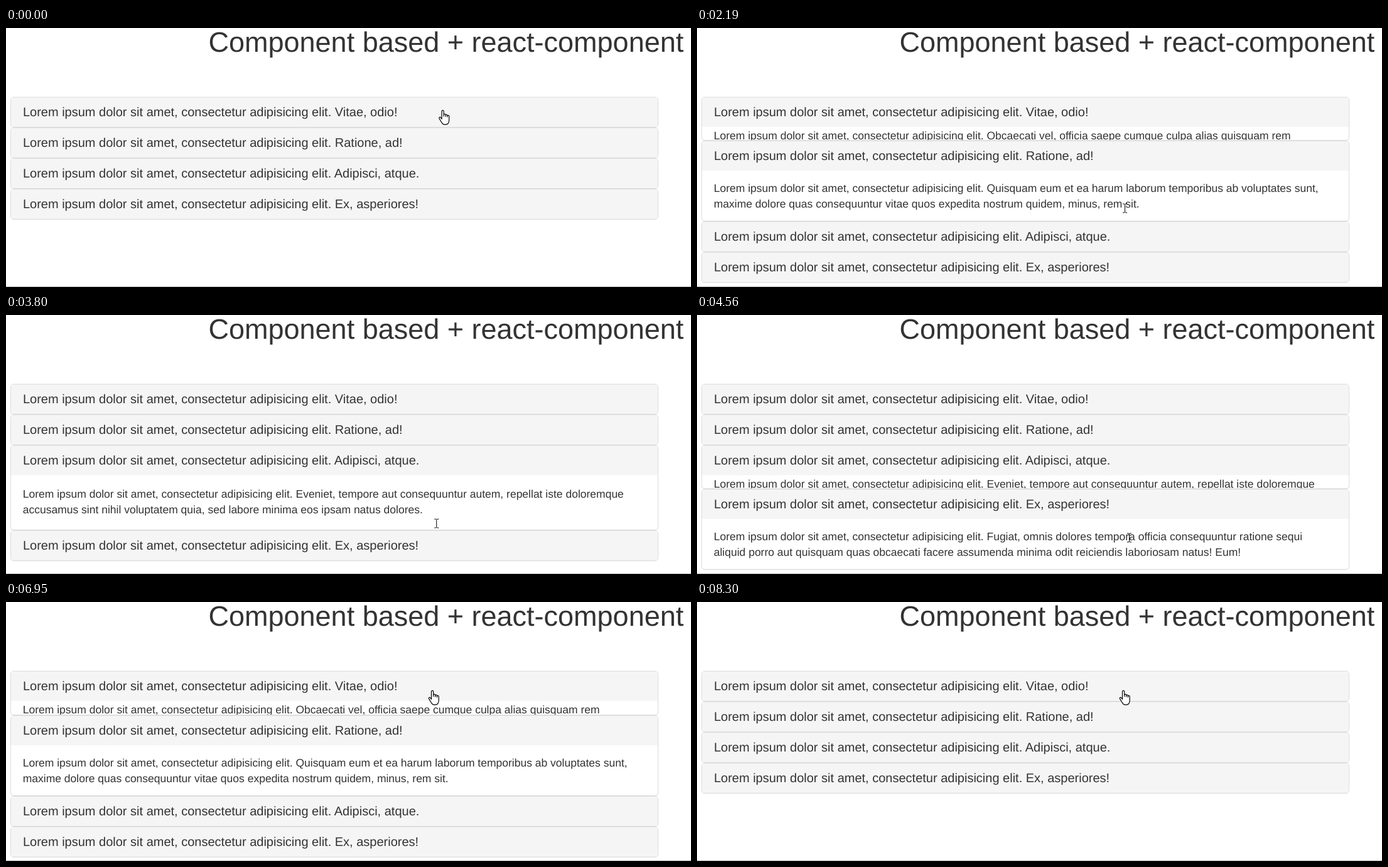
Write an HTML page that moves like this. It is 1091x414 px and loops after 8.69 s.

```html
<!DOCTYPE html>
<html lang="en">
<head>
<meta charset="utf-8">
<title>Accordion</title>
<style>
  html, body { margin: 0; width: 100%; height: 100%; overflow: hidden; background: #fff; }
  #stage { position: relative; width: 1091px; height: 414px; overflow: hidden; }
  svg { position: absolute; left: 0; top: 0; overflow: visible; }
  text { font-family: Arial, "Liberation Sans", sans-serif; fill: #333; text-rendering: geometricPrecision; }
  .panel {
    position: absolute; left: 7px; width: 1030px; overflow: hidden; background: #fff;
    border: 1px solid #ddd; border-radius: 5px; box-shadow: 0 1px 1px rgba(0, 0, 0, .05);
  }
  .title { font-size: 20px; }
  .body { font-size: 17.5px; }
  #rule { position: absolute; top: 413px; width: 100%; height: 1px; background: #bbb; }
</style>
</head>
<body>
<div id="stage">
  <svg width="1091" height="60"><text x="322.5" y="38" font-size="45">Component based + react-component</text></svg>
  <div id="rule"></div>
</div>
<script>
const LOOP = 8690, TOP = 110, ROW = 49, BODY = 87, PADDING = 18.75;
const STEP = 75, LEAD = 35, DURATION = 260;
const LOREM = 'Lorem ipsum dolor sit amet, consectetur adipisicing elit. ';
const ITEMS = [
  ['Vitae, odio!',
   'Obcaecati vel, officia saepe cumque culpa alias quisquam rem',
   'repudiandae omnis dolorum doloremque, dicta pariatur unde iusto ex, eos neque laboriosam voluptatum.'],
  ['Ratione, ad!',
   'Quisquam eum et ea harum laborum temporibus ab voluptates sunt,',
   'maxime dolore quas consequuntur vitae quos expedita nostrum quidem, minus, rem sit.'],
  ['Adipisci, atque.',
   'Eveniet, tempore aut consequuntur autem, repellat iste doloremque',
   'accusamus sint nihil voluptatem quia, sed labore minima eos ipsam natus dolores.'],
  ['Ex, asperiores!',
   'Fugiat, omnis dolores tempora officia consequuntur ratione sequi',
   'aliquid porro aut quisquam quas obcaecati facere assumenda minima odit reiciendis laboriosam natus! Eum!']
];

// A click opens its panel and closes the open one; clicking the open panel just closes it.
const click = (at, panel) => ({ at, panel });
const clicks = [click(820, 0), click(2050, 1), click(3270, 2), click(4400, 3),
                click(5810, 1), click(6950, 0), click(8080, 0)];
let openPanel = -1;
for (const c of clicks) {
  c.closes = openPanel;
  c.opens = openPanel = c.panel === openPanel ? -1 : c.panel;
}

// Where the pointer comes to rest; longer ways take longer.
const rest = (at, x, y) => ({ at, x, y });
const rests = [rest(0, 695.5, 132), rest(1670, 681.5, 287), rest(2410, 684, 319),
               rest(3940, 688.5, 356), rest(5670, 692, 189), rest(6410, 679, 142)];

const smooth = x => x * x * (3 - 2 * x);
const opening = x => 1 - (1 - x) ** 2;
const closing = x => 1 - (.4 * x + .6 * smooth(x));

const stage = document.getElementById('stage');
const panels = ITEMS.map(([title, first, second]) => {
  const el = document.createElement('div');
  el.className = 'panel';
  el.innerHTML = `<svg width="1030" height="140">
    <g class="body"><text x="18.7" y="83">${LOREM}${first}</text><text x="18.7" y="108">${second}</text></g>
    <rect width="1030" height="47" fill="#f5f5f5"/>
    <text class="title" x="18.9" y="30">${LOREM}${title}</text></svg>`;
  stage.append(el);
  return { el, body: el.querySelector('.body') };
});

stage.insertAdjacentHTML('beforeend', `<svg width="1091" height="414"><g id="pointer">
  <path id="hand" transform="translate(-6.5 -1)" fill="#fff" stroke="#000" stroke-width="1.2" stroke-linejoin="round"
    d="M5 14.5V2.2a1.6 1.6 0 0 1 3.2 0V10V7.8a1.45 1.45 0 0 1 2.9 0V10.5V8.8a1.4 1.4 0 0 1 2.8 0V11.2V10a1.4 1.4 0 0 1 2.8 0V16c0 4.5-2.2 7.3-5.8 7.3H9.6c-2.4 0-3.8-1.6-4.9-3.6L1 13.6c-.9-1.7 1-2.9 2.3-1.4z"/>
  <path id="beam" fill="none" stroke="#000" d="M-3.5-7H-1L0-6L1-7H3.5M0-6V6M-3.5 7H-1L0 6L1 7H3.5"/>
</g></svg>`);
const [pointer, hand, beam] = ['pointer', 'hand', 'beam'].map(id => document.getElementById(id));

function pointerAt(t) {
  let { x, y } = rests[0];
  for (const r of rests.slice(1)) {
    const time = 150 + 2.7 * Math.hypot(r.x - x, r.y - y);
    const k = smooth(Math.min(1, Math.max(0, 1 - (r.at - t) / time)));
    x += (r.x - x) * k;
    y += (r.y - y) * k;
    if (k < 1) break;
  }
  return [x, y];
}

function draw(now) {
  // screen recording: the picture advances in fixed steps after each click
  const time = now % LOOP + 12;
  const last = clicks.findLast(c => c.at <= time) || { at: 0, opens: -1, closes: -1 };
  const elapsed = Math.floor((time - last.at) / STEP) * STEP;
  const x = Math.min(1, (elapsed + LEAD) / DURATION);
  const [px, py] = pointerAt(last.at + elapsed);
  let y = TOP, onHeader = false;

  panels.forEach(({ el, body }, i) => {
    const open = i === last.opens ? opening(x) : i === last.closes ? closing(x) : 0;
    const height = Math.round(BODY * open);
    el.style.top = y + 'px';
    el.style.height = ROW - 2 + height + 'px';
    // padding collapses along with the height
    body.setAttribute('transform', `translate(0 ${Math.round(-PADDING * (1 - open ** 1.4))})`);
    onHeader ||= py >= y && py < y + ROW;
    y += ROW + height;
  });

  pointer.setAttribute('transform', `translate(${px} ${py})`);
  hand.style.display = onHeader ? '' : 'none';
  beam.style.display = onHeader ? 'none' : '';
}

function tick() {
  draw(performance.now());
  requestAnimationFrame(tick);
}
tick();
</script>
</body>
</html>
```
